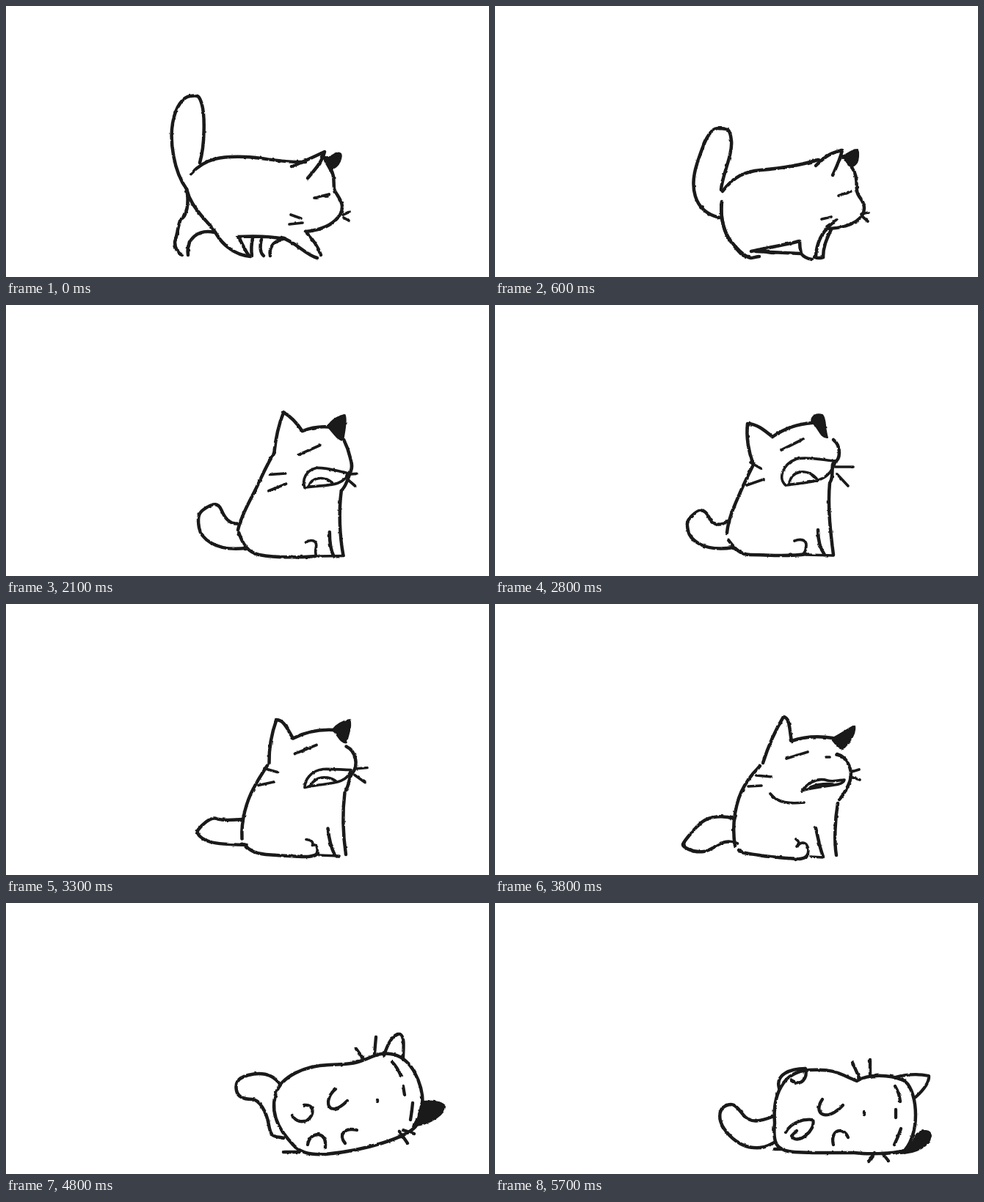
These frames come from a looping animation (658 px wide and 370 px high, 5.8 s). An HTML page without scripts:

```html
<!DOCTYPE html>
<html lang="en">
<head>
<meta charset="utf-8">
<title>Sleepy cat</title>
<style>
html, body { margin: 0; width: 100%; height: 100%; overflow: hidden; background: #fff; }
svg { display: block; width: 658px; height: 370px; }
path { fill: none; stroke: #1a1a1a; stroke-width: 4.5; stroke-linecap: round; stroke-linejoin: round; }
.thin path, path.thin { stroke-width: 3.7; }
#lie .thin { stroke-width: 4.3; }
.dark { fill: #1a1a1a; stroke-width: 2; }
path, g { animation: 5.8s infinite step-end; }

/* who is on stage when */
#up { animation-name: up; transform-origin: 400px 345px; }
#lie { animation-name: lie; transform-origin: 390px 342px; }
@keyframes up {
  0%, 65.51% { visibility: visible; transform: skewX(0deg) scaleY(1); animation-timing-function: steps(6); }
  75.86% { visibility: visible; transform: skewX(-15deg) scaleY(1.11); animation-timing-function: step-end; }
  77.58%, 100% { visibility: hidden; transform: skewX(-15deg) scaleY(1.11); }
}
@keyframes lie {
  0% { visibility: hidden; transform: rotate(-26deg); }
  77.58% { visibility: visible; transform: rotate(-26deg); animation-timing-function: steps(3); }
  82.75%, 100% { visibility: visible; transform: rotate(0deg); }
}
#walkOnly { animation-name: early; }
#sitOnly { animation-name: late; }
#yawn { animation-name: yawn; }
#calm { animation-name: calm; }
@keyframes early { 0% { opacity: 1; } 13.79%, 100% { opacity: 0; } }
@keyframes late { 0% { opacity: 0; } 17.24%, 100% { opacity: 1; } }
@keyframes yawn { 0% { opacity: 0; } 20.68%, 100% { opacity: 1; } }
@keyframes calm { 0% { opacity: 0; } 60.34%, 100% { opacity: 1; } }

/* upright cat */
#tail { animation-name: tail; }
@keyframes tail {
  0% { d: path("M264,214 C271,190 271,150 267,135 S260,122 251,123 S231,136 227,160 S228,225 246,250"); animation-timing-function: steps(2); }
  3.44% { d: path("M279,228 C285,198 287,146 281,130 S270,117 261,119 S243,134 239,160 S238,238 266,264"); animation-timing-function: steps(4); }
  10.34% { d: path("M308,251 C309,232 324,203 322,184 S316,168 304,167 S284,188 275,216 S268,280 306,289"); animation-timing-function: steps(8); }
  24.13% { d: path("M316,302 C306,298 300,284 296,271 S280,266 271,270 S261,285 263,300 S285,336 328,333"); animation-timing-function: steps(14); }
  48.27% { d: path("M317,295 C308,301 298,303 291,289 S275,281 268,288 S261,298 263,308 S280,338 325,331"); animation-timing-function: steps(10); }
  65.51%, 100% { d: path("M326,293 C310,288 293,290 283,297 S257,325 256,328 S268,340 284,338 S308,318 330,327"); }
}
/* back, haunch, chest, front leg */
#body { animation-name: body; }
@keyframes body {
  0% { d: path("M252,229 C272,207 295,205 325,206 S370,214 408,213 M246,250 C250,266 258,276 266,286 S280,300 287,312 S310,340 333,342 M408,308 C416,316 424,326 429,340 M375,316 C395,322 408,340 424,344"); animation-timing-function: steps(6); }
  10.34% { d: path("M310,253 C325,233 340,226 362,224 S415,218 440,210 M309,267 C306,292 314,312 322,322 S336,338 343,342 S350,343 360,342 M458,305 C452,318 447,328 447,343 M460,296 C448,306 438,320 437,342"); animation-timing-function: steps(8); }
  24.13% { d: path("M317,301 C325,282 340,265 352,244 S375,205 398,192 M317,301 C319,318 326,333 342,341 S368,346 385,346 S405,346 417,346 M457,274 C453,292 452,322 458,342 M442,313 C443,325 442,336 443,345"); animation-timing-function: steps(5); }
  32.75% { d: path("M316,306 C321,286 334,266 343,248 S358,214 370,196 M317,308 C321,324 328,337 344,341 S370,345 387,345 S407,345 420,344 M457,257 C453,284 454,318 459,342 M441,311 C441,324 442,336 446,344"); animation-timing-function: steps(9); }
  48.27% { d: path("M316,311 C318,290 328,270 334,256 S346,230 351,220 M318,321 C326,332 334,341 348,341 S375,342 390,342 S412,342 424,340 M456,243 C453,275 457,310 461,341 M440,307 C440,322 444,334 449,341"); animation-timing-function: steps(10); }
  65.51%, 100% { d: path("M327,330 C322,300 328,268 340,248 S354,230 361,221 M332,336 C336,341 350,341 360,343 S385,346 398,347 S422,350 426,342 M467,272 C463,295 462,325 465,343 M437,306 C440,318 442,332 447,345"); }
}
/* pale ear, crown, muzzle */
#head { animation-name: head; }
@keyframes head {
  0% { d: path("M389,219 C400,215 415,208 434,199 C431,212 422,222 411,235 M430,206 Q434,208 438,208 M443,224 C448,232 446,242 447,249 S458,264 458,274 S448,304 408,308"); animation-timing-function: steps(6); }
  10.34% { d: path("M437,218 C450,205 458,200 473,197 C470,210 465,220 460,231 M472,205 Q475,206 478,207 M486,220 C494,231 492,242 493,252 S503,264 503,276 S490,302 455,304"); animation-timing-function: steps(8); }
  24.13% { d: path("M386,202 C400,190 418,180 429,168 C430,182 424,198 409,207 M429,183 Q440,183 450,186 M459,194 C464,208 464,216 469,226 S477,238 475,248 S466,272 457,274"); animation-timing-function: steps(5); }
  32.75% { d: path("M369,198 C374,178 380,158 388,142 C398,150 406,160 411,170 M411,170 Q425,166 441,168 M460,184 C465,196 467,204 469,211 S474,222 472,230 S464,252 457,257"); animation-timing-function: steps(9); }
  48.27% { d: path("M352,218 C344,196 342,180 344,162 C356,162 366,170 378,180 M378,180 Q402,163 432,161 M461,184 C466,188 469,194 469,201 S467,213 462,215 S462,232 457,241"); animation-timing-function: steps(10); }
  65.51%, 100% { d: path("M365,217 C372,195 382,172 393,154 C402,155 401,172 404,187 M404,187 Q430,178 460,183 M466,205 C474,207 480,214 483,222 S486,238 481,248 S474,262 469,267"); }
}
#ear { animation-name: ear; }
@keyframes ear {
  0% { d: path("M430,204 C437,209 444,205 449,201 C458,199 458,204 455,212 C452,219 447,222 441,224 Z"); animation-timing-function: steps(6); }
  10.34% { d: path("M473,205 C481,202 486,196 494,196 C496,202 495,210 493,214 C488,221 483,220 479,214 Z"); animation-timing-function: steps(8); }
  24.13% { d: path("M449,186 C462,184 470,180 482,178 C482,186 474,196 467,202 C461,200 458,194 456,190 Z"); animation-timing-function: steps(5); }
  32.75% { d: path("M440,168 C447,158 458,152 466,150 C469,158 464,176 461,186 C453,185 448,176 440,168 Z"); animation-timing-function: steps(9); }
  48.27% { d: path("M431,160 C431,150 439,148 446,150 C451,154 449,168 453,181 C443,182 441,166 431,160 Z"); animation-timing-function: steps(10); }
  65.51%, 100% { d: path("M458,184 C468,180 478,172 490,166 C492,176 484,188 474,198 C466,197 464,190 458,184 Z"); }
}
/* eye, whiskers */
#marks { animation-name: marks; }
@keyframes marks {
  0% { d: path("M420,262 L440,257 M388,285 L402,290 M386,298 L404,296 M459,285 L468,281 M460,289 L467,293 M434,260 L438,260"); animation-timing-function: steps(6); }
  10.34% { d: path("M468,259 L485,253 M445,291 L458,288 M452,301 L465,292 M499,284 L509,282 M500,287 L508,294 M478,256 L481,255"); animation-timing-function: steps(8); }
  24.13% { d: path("M415,223 L441,215 M383,249 L407,244 M382,267 L406,254 M475,250 L487,249 M473,256 L485,262 M428,219 L431,218"); animation-timing-function: steps(5); }
  32.75% { d: path("M402,206 L430,194 M364,236 L386,232 M362,256 L386,246 M466,234 L475,233 M465,240 L474,247 M415,200 L418,199"); animation-timing-function: steps(9); }
  48.27% { d: path("M390,198 L420,183 M348,215 L362,223 M343,246 L366,238 M464,221 L488,221 M466,231 L481,247 M404,191 L406,190"); animation-timing-function: steps(10); }
  65.51%, 100% { d: path("M397,211 L426,202 M356,234 L377,236 M345,249 L363,248 M486,229 L496,226 M484,236 L497,240 M411,207 L413,206"); }
}
/* belly and stepping legs */
#walkOnly path { animation-name: legs; }
@keyframes legs {
  0% { d: path("M316,315 C340,314 360,314 378,318 M246,250 C250,270 246,288 238,291 C234,300 234,310 230,322 C230,332 235,338 240,340 M248,340 C245,318 262,304 284,309 M318,317 C322,326 326,334 331,341 M348,319 C345,330 347,338 351,341 M360,341 C358,330 364,322 375,319 M336,317 C334,326 334,334 335,341"); animation-timing-function: steps(3); }
  5.17% { d: path("M335,320 C360,318 380,318 400,320 M270,262 C272,282 274,292 272,300 C270,315 266,330 265,336 C266,340 270,342 276,342 M282,342 C286,325 290,318 306,314 M334,319 C334,328 333,336 332,342 M395,320 C398,328 402,336 402,342 M412,342 C412,332 414,326 420,322 M348,319 C347,326 348,334 350,341"); animation-timing-function: steps(3); }
  10.34%, 100% { d: path("M349,335 C372,330 395,326 415,321 M309,268 C306,292 314,312 320,320 C326,328 332,336 336,339 C340,342 342,342 346,342 M355,335 C375,336 395,337 416,338 M415,321 C415,326 416,334 417,338 M417,338 C420,342 425,345 432,346 M436,343 C440,345 444,344 447,343 M360,333 C366,335 372,337 380,337"); }
}
#sitOnly path { animation-name: paws; }
@keyframes paws {
  0%, 24.13% { d: path("M409,326 C416,320 424,322 421,333 C418,340 422,344 427,344 M427,345 L459,343"); animation-timing-function: steps(14); }
  48.27% { d: path("M408,322 C416,319 424,320 424,328 C424,334 422,338 419,341 M424,341 L461,342"); animation-timing-function: steps(10); }
  65.51%, 100% { d: path("M410,321 C416,325 414,330 411,331 C422,318 432,334 424,346 M430,345 L447,346"); }
}
/* lips, tongue */
#yawn path { animation-name: mouth; }
@keyframes mouth {
  0%, 24.13% { d: path("M421,264 C424,256 430,250 439,251 C447,253 452,259 460,262 C448,263 434,261 421,264 M456,258 C460,258 466,258 472,258"); animation-timing-function: steps(5); }
  32.75% { d: path("M410,250 C408,238 414,228 426,226 C440,226 456,232 466,234 C462,250 438,246 410,250 M416,248 C420,238 436,236 446,244"); animation-timing-function: steps(9); }
  48.27% { d: path("M396,246 C386,238 390,218 411,210 C428,207 448,212 464,213 C455,246 425,241 396,246 M401,244 C403,226 425,222 438,237"); animation-timing-function: steps(10); }
  65.51%, 100% { d: path("M418,255 C428,243 440,237 453,241 C460,243 468,241 476,240 C474,250 448,246 418,255 M430,250 C440,246 450,245 460,246"); }
}

/* lying cat */
#lieTail { animation-name: lieTail; }
@keyframes lieTail {
  0%, 82.75% { d: path("M372,246 C362,232 345,231 330,235 S312,246 314,256 S325,268 335,268 S355,285 358,303 S365,318 378,321"); animation-timing-function: steps(5); }
  91.37% { d: path("M380,291 C362,298 340,306 326,291 S312,268 302,274 S294,294 301,306 S328,334 350,334 S372,331 382,326"); animation-timing-function: steps(4); }
  98.27%, 100% { d: path("M380,291 C362,298 348,302 338,289 S324,272 314,277 S304,296 312,308 S335,333 352,334 S372,331 382,326"); }
}
#lieBody { animation-name: lieBody; }
@keyframes lieBody {
  0%, 82.75% { d: path("M367,262 C374,236 408,222 440,221 S478,219 498,210 C518,201 542,204 557,232 S570,290 558,305 C546,320 490,338 435,343 C420,344 402,342 392,331 S358,296 367,262 M378,340 L400,340"); animation-timing-function: steps(9); }
  98.27%, 100% { d: path("M381,300 C378,262 392,230 428,228 S470,234 493,243 C508,233 538,234 556,242 S582,310 558,338 C540,343 505,343 490,341 C450,341 415,342 400,339 S378,330 381,300 M381,336 L393,336"); }
}
#lieEar { animation-name: lieEar; }
@keyframes lieEar {
  0%, 82.75% { d: path("M566,271 C580,270 592,270 598,277 C598,288 580,302 554,305 C560,296 564,284 566,271 Z"); animation-timing-function: steps(9); }
  98.27%, 100% { d: path("M574,316 C582,308 594,310 594,318 C593,330 575,343 549,342 C562,336 570,326 574,316 Z"); }
}
/* pale ear, whiskers, face */
#lieFace { animation-name: lieFace; }
@keyframes lieFace {
  0%, 82.75% { d: path("M515,208 C520,192 528,177 537,179 C544,183 541,200 541,214 M477,199 L487,213 M504,183 L502,206 M536,312 L547,328 M541,310 L556,315 M526,217 Q533,224 538,236 M541,250 L543,262 M554,273 Q553,285 551,296 M506,269 L506,271"); animation-timing-function: steps(9); }
  98.27%, 100% { d: path("M545,238 C560,234 576,233 591,236 C592,246 583,256 573,265 M487,218 L496,238 M511,214 L511,236 M517,341 L509,353 M528,342 L536,352 M545,250 Q551,260 552,271 M546,282 L546,293 M553,308 Q549,320 544,330 M503,285 L503,289"); }
}
#liePaws { animation-name: liePaws; }
@keyframes liePaws {
  0%, 82.75% { d: path("M390,290 C395,299 404,300 411,296 C420,290 421,274 406,276 M449,254 C431,268 438,297 465,270 M411,330 C413,318 421,316 426,316 C434,318 436,324 435,333 L435,334 M462,328 C452,316 462,306 478,310"); animation-timing-function: steps(9); }
  98.27%, 100% { d: path("M387,253 C382,234 402,226 423,226 C426,238 418,252 404,242 M446,268 C432,288 452,300 474,276 M396,313 C403,300 420,294 433,296 C438,310 412,332 404,318 L411,311 M461,330 C456,310 474,304 481,320"); }
}
</style>
</head>
<body>
<svg viewBox="0 0 658 370" role="img" aria-label="A cat walks, sits, yawns and lies down">
  <filter id="ink" x="0" y="0" width="658" height="370" filterUnits="userSpaceOnUse" color-interpolation-filters="sRGB">
    <feTurbulence type="fractalNoise" baseFrequency=".16" numOctaves="2" seed="4"/>
    <feDisplacementMap in="SourceGraphic" scale="2.5" xChannelSelector="R" yChannelSelector="G"/>
  </filter>
  <g filter="url(#ink)">
    <g id="up">
      <path id="tail"/>
      <path id="body"/>
      <path id="head"/>
      <path id="ear" class="dark"/>
      <path id="marks" class="thin"/>
      <g id="walkOnly"><path/></g>
      <g id="sitOnly" class="thin"><path/></g>
      <g id="yawn" class="thin"><path/></g>
      <g id="calm" class="thin"><path d="M375,259 C385,272 402,273 421,271 M451,209 L456,209 M465,206 L469,207"/></g>
    </g>
    <g id="lie">
      <path id="lieTail"/>
      <path id="lieBody"/>
      <path id="lieEar" class="dark"/>
      <path id="lieFace" class="thin"/>
      <path id="liePaws" class="thin"/>
    </g>
  </g>
</svg>
</body>
</html>
```
